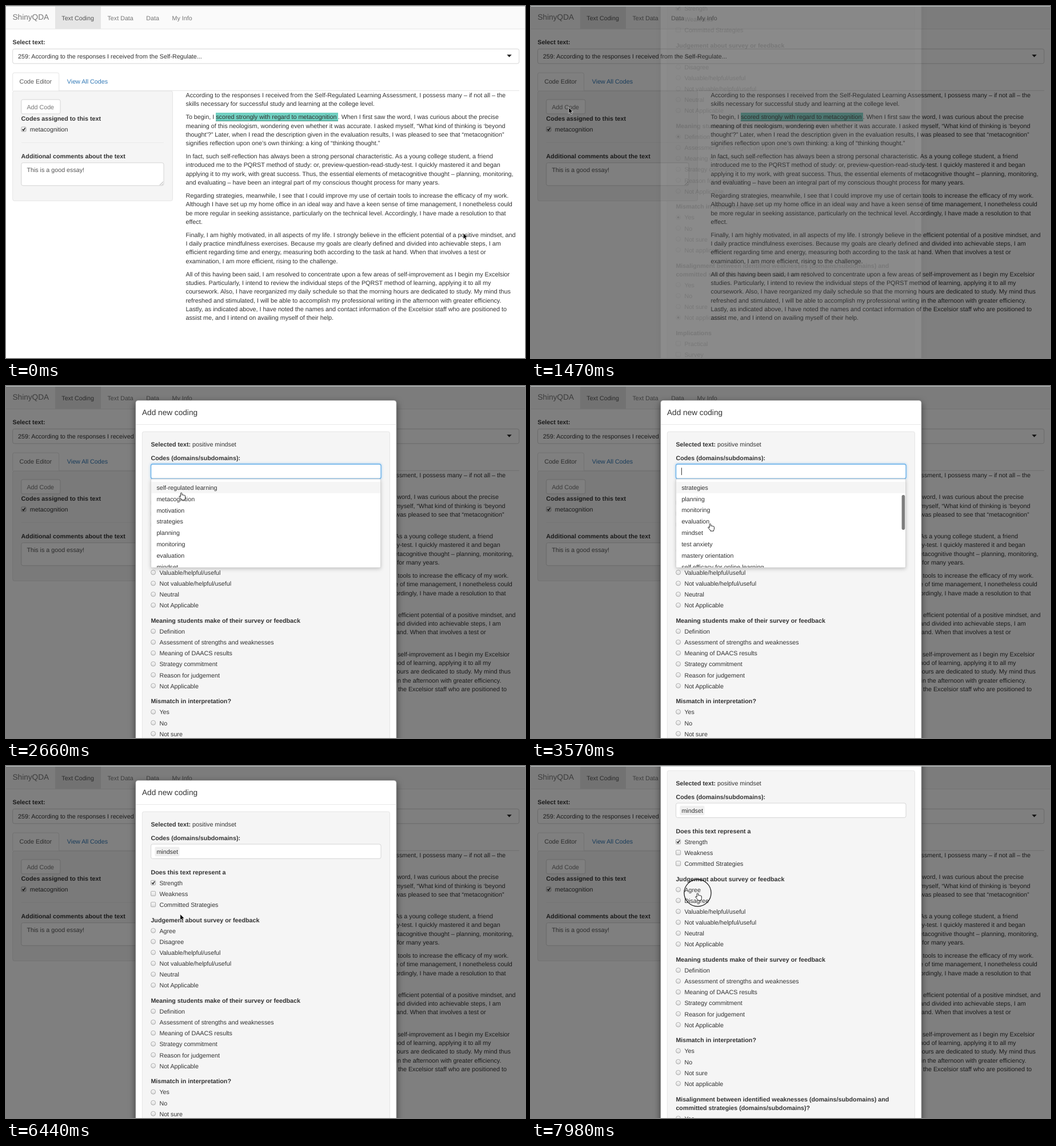
An HTML page for the animation above (8 s loop, 908 px wide and 617 px high).

```html
<!DOCTYPE html>
<html lang="en">
<head>
<meta charset="utf-8">
<title>Text coding</title>
<style>
html, body { margin: 0; width: 100%; height: 100%; overflow: hidden; background: #fff; }
svg { display: block; width: 908px; height: 617px; cursor: default; }
text {
  font: 10.73px "Liberation Sans", Arial, sans-serif;
  fill: #333; white-space: pre; text-rendering: geometricPrecision;
}
.b { font-weight: bold; }
.h { font-size: 13.65px; }
#essay text { font-size: 10.78px; }
.frame { filter: drop-shadow(0 4px 6px rgba(0,0,0,.5)); }
.list { filter: drop-shadow(0 2px 3px rgba(0,0,0,.2)); }
</style>
</head>
<body>
<svg id="stage" viewBox="0 0 908 617" xmlns="http://www.w3.org/2000/svg"></svg>
<script>
const LOOP = 8000, STEP = 70, ITEM = 19.85;

// y is the middle of the line
const text = (x, y, s, attr = '') => `<text x="${x}" y="${y + 3.8}" ${attr}>${s}</text>`;
const bold = (x, y, s) => text(x, y, s, 'class="b"');
const box = (x, y, w, h, fill, stroke = 'none', r = 0, attr = '') =>
  `<rect x="${x}" y="${y}" width="${w}" height="${h}" rx="${r}" fill="${fill}" stroke="${stroke}" stroke-width=".8" ${attr}/>`;
const line = (x1, x2, y, color) => box(x1, y, x2 - x1, .8, color);
const group = (id, body, attr = '') => `<g id="${id}" ${attr}>${body}</g>`;

const checkbox = (x, y) => box(x - 4, y - 4, 8, 8, 'url(#knob)', '#999', 1.2);
const tick = (x, y) => `<path d="M${x - 2.3} ${y}l1.8 2.2l3-4.6" fill="none" stroke="#222" stroke-width="1.5"/>`;
const radio = (x, y) => `<circle cx="${x}" cy="${y}" r="4" fill="url(#knob)" stroke="#999" stroke-width=".8"/>`;
const dot = (x, y) => `<circle cx="${x}" cy="${y}" r="1.9" fill="#333"/>`;

const essay = [
  ['According to the responses I received from the Self-Regulated Learning Assessment, I possess many – if not all – the',
   'skills necessary for successful study and learning at the college level.'],
  ['',
   'meaning of this neologism, wondering even whether it was accurate. I asked myself, “What kind of thinking is ‘beyond',
   'thought’?” Later, when I read the description given in the evaluation results, I was pleased to see that “metacognition”',
   'signifies reflection upon one’s own thinking: a king of “thinking thought.”'],
  ['In fact, such self-reflection has always been a strong personal characteristic. As a young college student, a friend',
   'introduced me to the PQRST method of study: or, preview-question-read-study-test. I quickly mastered it and began',
   'applying it to my work, with great success. Thus, the essential elements of metacognitive thought – planning, monitoring,',
   'and evaluating – have been an integral part of my conscious thought process for many years.'],
  ['Regarding strategies, meanwhile, I see that I could improve my use of certain tools to increase the efficacy of my work.',
   'Although I have set up my home office in an ideal way and have a keen sense of time management, I nonetheless could',
   'be more regular in seeking assistance, particularly on the technical level. Accordingly, I have made a resolution to that',
   'effect.'],
  ['Finally, I am highly motivated, in all aspects of my life. I strongly believe in the efficient potential of a positive mindset, and',
   'I daily practice mindfulness exercises. Because my goals are clearly defined and divided into achievable steps, I am',
   'efficient regarding time and energy, measuring both according to the task at hand. When that involves a test or',
   'examination, I am more efficient, rising to the challenge.'],
  ['All of this having been said, I am resolved to concentrate upon a few areas of self-improvement as I begin my Excelsior',
   'studies. Particularly, I intend to review the individual steps of the PQRST method of learning, applying it to all my',
   'coursework. Also, I have reorganized my daily schedule so that the morning hours are dedicated to study. My mind thus',
   'refreshed and stimulated, I will be able to accomplish my professional writing in the afternoon with greater efficiency.',
   'Lastly, as indicated above, I have noted the names and contact information of the Excelsior staff who are positioned to',
   'assist me, and I intend on availing myself of their help.']
];

function essayLines() {
  let y = 156.2, out = '';
  for (const lines of essay) {
    for (const s of lines) {
      if (s) out += text(314.5, y, s);
      y += 15.3;
    }
    y += 7.65;
  }
  return out;
}

function page() {
  return box(0, 0, 908, 617, '#fff') + box(0, 0, 908, 40, '#fafafa') + line(0, 908, 39.8, '#e0e0e0')
    + text(11.5, 20.6, 'ShinyQDA', 'class="h" style="fill:#777"')
    + box(86, 1, 80, 39, '#e5e5e5')
    + text(97.3, 20.8, 'Text Coding', 'style="fill:#555"')
    + [[177.5, 'Text Data'], [245.3, 'Data'], [290.5, 'My Info']]
        .map(([x, s]) => text(x, 20.8, s, 'style="fill:#777"')).join('')
    + bold(11.5, 63.6, 'Select text:')
    + box(11.7, 75.3, 886, 25.6, '#fff', '#ccc', 3)
    + text(21, 88, '259: According to the responses I received from the Self-Regulate...')
    + '<path d="M876.3 85.2h8.4l-4.2 4.6z" fill="#222"/>'
    + line(11.5, 898, 147.8, '#ddd')
    + '<path d="M11.7 148.8V120q0-3 3-3H89.7q3 0 3 3V148.8" fill="#fff" stroke="#ddd" stroke-width=".8"/>'
    + text(23.4, 132.4, 'Code Editor', 'style="fill:#555"')
    + text(106.8, 132.4, 'View All Codes', 'style="fill:#337ab7"')
    + box(11.7, 149, 279.8, 192.6, '#f5f5f5', '#e0e0e0', 3)
    + box(26.8, 164, 68.2, 25, '#fff', '#ccc', 3)
    + text(36.4, 176.8, 'Add Code', 'style="fill:#777"')
    + bold(26.6, 197.4, 'Codes assigned to this text')
    + checkbox(31, 216) + tick(31, 216) + text(41.8, 216.4, 'metacognition')
    + line(27, 276, 239, '#e9e9e9')
    + bold(26.6, 263.2, 'Additional comments about the text')
    + box(26.8, 274.8, 249.2, 40, '#fff', '#ccc', 3)
    + text(36.4, 287.4, 'This is a good essay!', 'style="fill:#555"')
    + '<path d="M269 314l6-6M272.3 314l2.7-2.7" stroke="#777" stroke-width=".7"/>'
    + box(367, 187, 214, 15, '#70d0c1') + line(367, 581, 201, '#3c8577')
    + box(792.3, 394, 75, 15.3, '#b3d7ff', 'none', 0, 'id="selection"')
    + group('essay', text(314.5, 194.5, 'To begin, I')
      + text(367.2, 194.5, 'scored strongly with regard to metacognition')
      + text(580.7, 194.5, '. When I first saw the word, I was curious about the precise')
      + essayLines());
}

const agreement = ['Yes', 'No', 'Not sure', 'Not applicable'];
const questions = [
  [['Does this text represent a'], ['Strength', 'Weakness', 'Committed Strategies'], -1],
  [['Judgement about survey or feedback'],
   ['Agree', 'Disagree', 'Valuable/helpful/useful', 'Not valuable/helpful/useful', 'Neutral', 'Not Applicable'], 0],
  [['Meaning students make of their survey or feedback'],
   ['Definition', 'Assessment of strengths and weaknesses', 'Meaning of DAACS results',
    'Strategy commitment', 'Reason for judgement', 'Not Applicable'], 0],
  [['Mismatch in interpretation?'], agreement, 0],
  [['Misalignment between identified weaknesses (domains/subdomains) and',
    'committed strategies (domains/subdomains)?'], agreement, 3],
  [['Implications'], ['Practical', 'Survey'], -1]
];

function form() {
  let y = 186, out = '', marks = '';
  questions.forEach(([title, options, picked], q) => {
    title.forEach((s, i) => { out += bold(253.4, y + i * 15.3, s); });
    y += 19 + (title.length - 1) * 15.3;
    const square = q === 0 || q === 5;
    options.forEach((s, i) => {
      out += (square ? checkbox : radio)(257.6, y - .4) + text(268.4, y, s);
      if (i === picked) marks += dot(257.6, y - .4);
      y += 19.1;
    });
    y += 7.7;
  });
  return out + group('marks', marks) + group('strength', tick(257.6, 204.6));
}

const chip = (id, s, w) =>
  group(id, box(260.5, 141.8, w, 16.4, '#efefef', 'none', 2) + text(263.4, 150, s));

function modal() {
  return box(226.6, 25, 456.6, 1000, '#fff', '#777', 4.6, 'class="frame"')
    + text(238, 46.7, 'Add new coding', 'class="h"')
    + line(227, 683, 67.2, '#e3e3e3')
    + box(238.4, 80, 433, 900, '#f5f5f5', '#e0e0e0', 3)
    + bold(253.4, 102.6, 'Selected text:') + text(326, 102.6, '', 'id="quote"')
    + bold(253.4, 125.7, 'Codes (domains/subdomains):')
    + box(253.6, 137, 402.4, 25.4, '#fff', '#ccc', 3, 'id="field"')
    + chip('chipOld', 'metacognition', 72) + chip('chipNew', 'mindset', 43)
    + box(263, 143.3, .9, 12.8, '#222', 'none', 0, 'id="caret"')
    + form()
    + group('drop', box(253.6, 163, 402, 155.4, '#fff', '#ccc', 2, 'class="list"')
      + group('view', box(254, 0, 401, ITEM, '#f5f5f5', 'none', 0, 'id="hover"') + group('items', ''), 'clip-path="url(#clip)"')
      + box(648.6, 0, 5.6, 61, '#7d7d7d', 'none', 2.8, 'id="thumb"'));
}

const $ = id => document.getElementById(id);
$('stage').innerHTML =
  `<defs>
    <linearGradient id="knob" x2="0" y2="1"><stop stop-color="#fafafa"/><stop offset="1" stop-color="#dcdcdc"/></linearGradient>
    <clipPath id="clip"><rect x="254" y="164" width="401" height="154"/></clipPath>
  </defs>`
  + page()
  + box(0, 0, 908, 617, '#000', 'none', 0, 'id="dim"')
  + group('modal', modal())
  + box(902, 0, 5, 361, '#111', 'none', 2.5, 'id="bar"')
  + '<circle id="ring" fill="none" stroke="#111" stroke-width="1.2"/>'
  + group('pointer',
      '<path id="arrow" d="M0 0V10.4L2.3 8.3L3.9 12L5.8 11.2L4.2 7.6H7.4Z" fill="#000" stroke="#fff" stroke-width=".7"/>'
    + '<path id="hand" d="M-1.2 1.2Q0-.8 1.2 1.2V4.4Q2.5 3.4 3.4 4.6Q4.7 3.9 5.4 5.1Q7 4.8 7 6.4V9Q7 10.6 6 12V13.2H.4V12L-3.4 7.8Q-4.2 6.2-2.7 6.1L-1.2 7.2Z" fill="#fff" stroke="#111" stroke-width=".9"/>')
  + box(0, 0, 908, 1, '#c3caca');

const codes = ['self-regulated learning', 'metacognition', 'motivation', 'strategies', 'planning', 'monitoring',
  'evaluation', 'mindset', 'test anxiety', 'mastery orientation', 'self efficacy for online learning',
  'self efficacy for writing', 'managing time', 'managing environment', 'help seeking', 'understanding'];
const listText = names => names.map((s, i) => text(263.4, 178 + i * ITEM, s)).join('');
const fullList = listText(codes), restList = listText(codes.filter(s => s !== 'mindset'));

const clamp = v => Math.max(0, Math.min(1, v));
const ramp = (t, a, b) => clamp((t - a) / (b - a));
const smooth = (t, a, b) => { const p = ramp(t, a, b); return p * p * (3 - 2 * p); };
const within = (t, a, b) => t >= a && t < b;

// time, x, y
const path = [
  [0, 800, 398], [210, 792, 403], [490, 867, 403], [630, 861, 457], [700, 861, 457], [840, 116, 131],
  [910, 116, 131], [1050, 66, 178], [1610, 66, 178], [1750, 174, 172], [2100, 300, 150], [2380, 300, 150],
  [3010, 316, 238], [3220, 316, 238], [3290, 313.5, 241], [4550, 313.5, 241], [4830, 241, 239], [5320, 241, 239],
  [5880, 292.5, 201.5], [6300, 292.5, 201.5], [6510, 309, 280], [7140, 309, 280], [7560, 291.5, 222.5]
];

function pointerAt(t) {
  const i = path.findIndex(k => k[0] > t);
  if (i < 0) return path[path.length - 1].slice(1);
  const [t0, x0, y0] = path[i - 1], [t1, x1, y1] = path[i], p = smooth(t, t0, t1);
  return [x0 + (x1 - x0) * p, y0 + (y1 - y0) * p];
}

const show = (id, on) => $(id).setAttribute('visibility', on ? 'visible' : 'hidden');
const set = (id, attrs) => { for (const k in attrs) $(id).setAttribute(k, attrs[k]); };
let listState = null;

function draw(t) {
  const fresh = t >= 1680, picked = t >= 4060, focus = within(t, 2170, 5110);

  // page
  show('selection', within(t, 280, 1260));
  set('selection', { width: 75 * ramp(t, 210, 490) });
  set('dim', { opacity: .5 * ramp(t, 1220, 1400) });

  // dialog slides down, later scrolls
  const enter = ramp(t, 1450, 1600);
  const scroll = t < 6650 ? 0 : 72 * (1 - Math.exp((6650 - t) / 182));
  const offset = -249 * Math.pow(1 - enter, 1.5) - scroll;
  set('modal', { opacity: Math.pow(enter, 1.15), transform: `translate(0 ${offset})` });
  $('quote').textContent = fresh ? 'positive mindset' : 'scored strongly with regard to metacognition';
  show('marks', !fresh);
  show('strength', !fresh || t >= 6230);
  show('chipOld', !fresh);
  show('chipNew', picked);
  set('field', { stroke: focus ? '#66afe9' : '#ccc', 'stroke-width': focus ? 1.3 : .8 });
  $('field').style.filter = focus ? 'drop-shadow(0 0 2px rgba(102,175,233,.7))' : 'none';
  show('caret', focus && Math.floor((t - 150) / 500) % 2 === 0);
  set('caret', { x: picked ? 306 : 263 });

  // code list
  $('drop').setAttribute('display', focus ? 'inline' : 'none');
  if (listState !== picked) {
    listState = picked;
    $('items').innerHTML = picked ? restList : fullList;
  }
  const shift = ITEM * (3 * smooth(t, 3360, 3570) + smooth(t, 3570, 3780));
  const active = t < 3290 ? 0 : t < 3920 ? 3 : 7;
  set('hover', { y: 168 + active * ITEM - shift });
  set('items', { transform: `translate(0 ${-shift})` });
  set('thumb', { y: 167.5 + shift * .395, opacity: ramp(t, 3290, 3430) * (1 - ramp(t, 4020, 4130)) });

  // window scrollbar
  set('bar', { y: 4 + scroll * .585, opacity: t < 6720 ? 0 : .6 * (1 - ramp(t, 7630, 7840)) });

  // pointer
  const [x, y] = pointerAt(t);
  const hand = within(t, 2450, 4760) || within(t, 5740, 6370) || t >= 7350;
  set('pointer', { transform: `translate(${x} ${y})` });
  show('hand', hand);
  show('arrow', !hand);
  const pressed = [[210, 560], [1050, 1190], [2100, 2240], [4060, 4130], [5040, 5180], [6090, 6230], [7980, 8000]]
    .some(([a, b]) => within(t, a, b));
  show('ring', pressed);
  set('ring', { cx: x, cy: y, r: hand ? 23.6 : 16 });
}

const start = performance.now();
function tickFrame() {
  const t = (performance.now() - start) % LOOP;
  draw(Math.floor(t / STEP) * STEP);
  requestAnimationFrame(tickFrame);
}
tickFrame();
</script>
</body>
</html>
```
